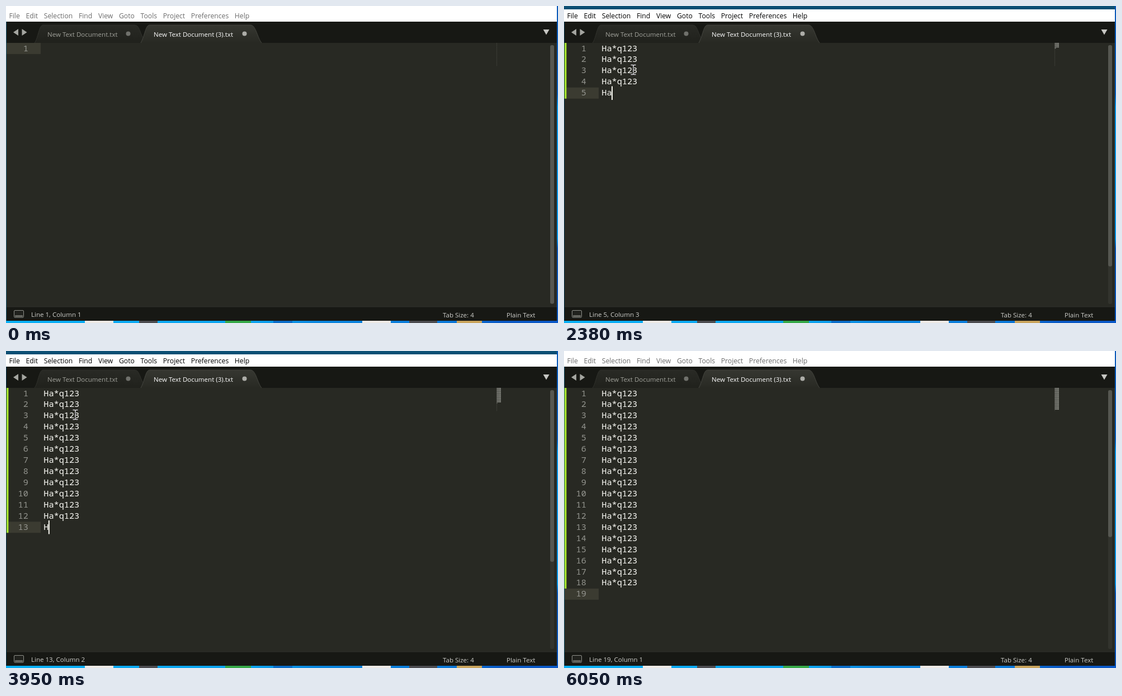
An HTML page that plays this animation: 987x567 px, repeating every 6.12 s.

```html
<!DOCTYPE html>
<html lang="en">
<head>
<meta charset="utf-8">
<title>Text editor</title>
<style>
  html, body { margin: 0; width: 100%; height: 100%; overflow: hidden; background: #282923; }
  svg { display: block; }
  text { font-family: "Open Sans", "Noto Sans", sans-serif; font-size: 11.55px; white-space: pre; }
  #menu { font-size: 12.2px; word-spacing: 7.5px; }
  .code text { font-family: "Noto Sans Mono", monospace; font-size: 15.23px; font-weight: 500; fill: #fbfbf6; }
  .code .number { fill: #94958f; font-weight: 400; text-anchor: end; }
  .status text { fill: #cfcfcb; }
  #mouse { mix-blend-mode: difference; }
</style>
</head>
<body>
<svg width="987" height="567" viewBox="0 0 987 567">
  <defs>
    <linearGradient id="activeTab" x2="0" y2="1">
      <stop stop-color="#363731"/><stop offset="1" stop-color="#282923"/>
    </linearGradient>
    <linearGradient id="idleTab" x2="0" y2="1">
      <stop stop-color="#292a25"/><stop offset="1" stop-color="#20211c"/>
    </linearGradient>
    <linearGradient id="desk">
      <stop stop-color="#08b0f6"/><stop offset=".45" stop-color="#0ca2ee"/>
      <stop offset=".56" stop-color="#0a86de"/><stop offset=".8" stop-color="#0a78d8"/>
      <stop offset=".9" stop-color="#0a58c4"/><stop offset="1" stop-color="#0a58c8"/>
    </linearGradient>
    <linearGradient id="edge" x2="0" y2="1">
      <stop stop-color="#0a58b8"/><stop offset=".28" stop-color="#0a62c0"/>
      <stop offset=".32" stop-color="#0896e8"/><stop offset=".74" stop-color="#0896e8"/>
      <stop offset=".77" stop-color="#0a58b8"/><stop offset="1" stop-color="#0a55bc"/>
    </linearGradient>
    <path id="idleShape" d="M51 66C57 59 59 34 66 34H230C238 34 239 46 245 57L241 66"/>
    <path id="activeShape" d="M241 66C248 55 249 34 257 34H437C447 34 449 56 457 66"/>
  </defs>

  <rect width="987" height="567" fill="#282923"/>
  <rect y="28" width="987" height="38" fill="#171814"/>
  <rect width="985" height="28" fill="#fff"/>
  <rect id="topEdge" width="987" height="6" fill="#0b4f74"/>
  <text id="menu" x="5.5" y="22">File Edit Selection Find View Goto Tools Project Preferences Help</text>

  <use href="#idleShape" fill="url(#idleTab)" stroke="#30312c"/>
  <use href="#activeShape" fill="url(#activeTab)" stroke="#44453f"/>
  <text x="74" y="54.5" fill="#a0a19a">New Text Document.txt</text>
  <text x="264" y="54.5" fill="#fff">New Text Document (3).txt</text>
  <circle cx="218.5" cy="49.5" r="4" fill="#70716c"/>
  <circle cx="426.5" cy="49.5" r="4" fill="#adada8"/>
  <path d="M13 47l9-6v12zM37.5 47l-9-6v12z" fill="#a4a5a0"/>
  <path d="M960.5 42h11l-5.5 9.5z" fill="#c6c6c2"/>

  <rect x="973" y="70" width="7" height="463" rx="3" fill="#33342e"/>
  <rect id="thumb" x="973" y="70" width="7" rx="3" fill="#565751"/>
  <rect id="activeRow" x="1" width="61" height="19.94" fill="#3b3b31"/>
  <rect id="changed" x="1" y="66" width="3.5" fill="#a6e22e"/>
  <g class="code" id="code"></g>
  <g id="minimap" stroke="#a3a49e" stroke-width="1.5" stroke-dasharray=".85 .25"></g>
  <rect id="caret" width="2" height="24.5" fill="#f8f8f0"/>

  <rect y="538" width="987" height="25" fill="#171814"/>
  <path d="M0 538H985" stroke="#30312c"/>
  <rect x="14.5" y="544.5" width="17" height="12.5" rx="1.5" fill="#20211d" stroke="#90918b"/>
  <path d="M16 553h14v3h-14z" fill="#666761"/>
  <g class="status">
    <text id="position" x="45" y="556"></text>
    <text x="781" y="556.5">Tab Size: 4</text>
    <text x="895" y="556.5">Plain Text</text>
  </g>

  <rect id="leftEdge" y="28" width="1" height="535"/>
  <rect x="985" width="2" height="563" fill="url(#edge)"/>
  <rect y="563" width="987" height="4" fill="url(#desk)"/>
  <g stroke-width="4">
    <path d="M141 565h51M637 565h51" stroke="#eeeae6"/>
    <path d="M238 565h33M721 565h50" stroke="#4c4c50"/>
    <path d="M392 565h46" stroke="#35a947"/>
    <path d="M478 565h34" stroke="#0a6cc8"/>
    <path d="M806 565h45" stroke="#c9a45c"/>
  </g>
  <path id="mouse" d="M-4.500-8.500h3q1.500 0 1.500 1.500q0-1.500 1.500-1.500h3M0-7v14M-4.500 8.500h3q1.500 0 1.500-1.500q0 1.500 1.500 1.500h3" fill="none" stroke="#fff" stroke-width="1.5"/>
</svg>

<script>
const LOOP = 6120, TICK = 77;
const ENTER = 70, FOCUS = 440, TYPE = 1525, TYPED = 4630, LEAVE = 5010, GONE = 5500, BLUR = 6050;
const WORD = 'Ha*q123', KEYS = WORD.length + 1, ROWS = 19;
const TOP = 66, ROW = 19.94, CHAR = 9.14, MINI_ROW = 2.2, MINI_CHAR = 1.1, MINI_X = 877.5;

// Typing pace as [ticks since TYPE, keys pressed], linear in between
const pace = [[2, 0], [3, 8], [4, 8], [5, 16], [11, 34], [20, 72], [26, 96], [31, 97], [37, 128], [40, 144]];

const byId = id => document.getElementById(id);
const clamp = x => Math.min(1, Math.max(0, x));
const mix = (a, b, u) => a + (b - a) * u;
const ticksSince = (t, start) => Math.floor((t - start) / TICK);

function add(parent, tag, attrs, text = '') {
  const node = document.createElementNS('http://www.w3.org/2000/svg', tag);
  for (const name in attrs) node.setAttribute(name, attrs[name]);
  node.textContent = text;
  return byId(parent).appendChild(node);
}

function set(id, attrs) {
  for (const name in attrs) byId(id).setAttribute(name, attrs[name]);
}

function keysAt(t) {
  const tick = ticksSince(t, TYPE);
  const next = pace.findIndex(point => point[0] > tick);
  if (next === 0) return 0;
  if (next < 0) return ROWS * KEYS - KEYS;
  const [[t0, k0], [t1, k1]] = pace.slice(next - 1, next + 1);
  return Math.floor(mix(k0, k1, (tick - t0) / (t1 - t0)));
}

// Solid while typing; otherwise fades out and back in, in three steps each
function caretAt(t) {
  if (t < FOCUS || t >= BLUR) return 0;
  if (t >= TYPE + 3 * TICK && t < TYPED) return 1;
  const since = t - (t < TYPED ? FOCUS : TYPED);
  const fade = start => clamp((ticksSince(since, start) + 1) / 3);
  return 1 - fade(380) + fade(1030);
}

function mouseAt(t) {
  if (t < ENTER || t >= GONE) return null;
  if (t < FOCUS) {
    const rest = (1 - clamp(ticksSince(t, ENTER) / 3)) ** 1.4;
    return [mix(115, 524, rest), mix(112, 408, rest)];
  }
  const u = clamp((ticksSince(t, LEAVE) + 1) / 6), gone = u * u * (3 - 2 * u);
  return [mix(124, 748, gone), mix(114, 560, gone)];
}

const rows = Array.from({ length: ROWS }, (_, i) => {
  const y = TOP + 14.5 + i * ROW, miniY = TOP + 0.8 + i * MINI_ROW;
  return {
    number: add('code', 'text', { class: 'number', x: 39.8, y }, i + 1),
    text: add('code', 'text', { x: 67.3, y }),
    mini: add('minimap', 'line', { x1: MINI_X, y1: miniY, y2: miniY })
  };
});

function draw(t) {
  const keys = keysAt(t);
  const row = Math.floor(keys / KEYS), column = keys % KEYS;
  const rowY = TOP + row * ROW;

  rows.forEach(({ number, text, mini }, i) => {
    const count = i < row ? WORD.length : i === row ? column : 0;
    number.style.display = i <= row ? '' : 'none';
    text.textContent = WORD.slice(0, count);
    mini.setAttribute('x2', MINI_X + count * MINI_CHAR);
  });

  set('activeRow', { y: rowY });
  set('changed', { height: (row + (column > 0)) * ROW });
  set('caret', { x: 66.7 + column * CHAR, y: rowY - 2.3, opacity: caretAt(t) });
  set('thumb', { height: 462.5 * 472 / (472 + row * ROW) });
  byId('position').textContent = `Line ${row + 1}, Column ${column + 1}`;

  const focused = t >= FOCUS && t < BLUR;
  set('menu', { fill: focused ? '#000' : '#6c6c6c' });
  set('topEdge', { opacity: focused ? 1 : 0 });
  set('leftEdge', { fill: focused ? '#123f56' : '#2a6680' });

  const mouse = mouseAt(t);
  set('mouse', { visibility: mouse ? 'visible' : 'hidden', transform: `translate(${mouse || '0'})` });
}

function tick() {
  draw(performance.now() % LOOP);
  requestAnimationFrame(tick);
}
tick();
</script>
</body>
</html>
```
